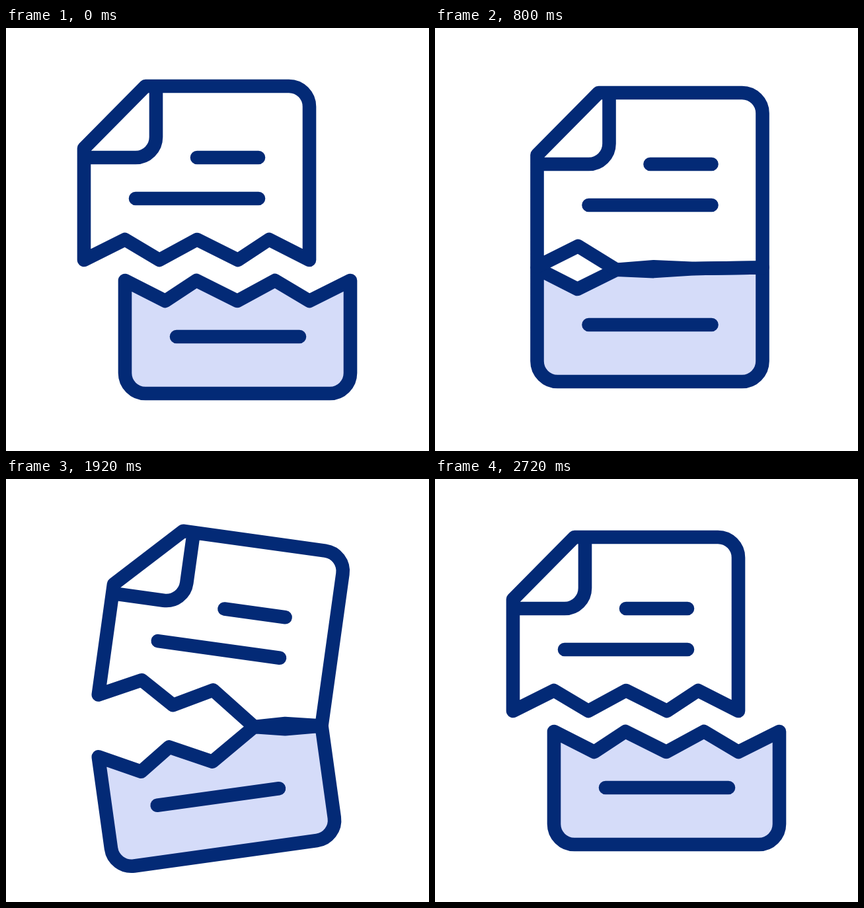
Write an HTML page with a canvas that moves like this. It is 640x640 px and loops after 3000 ms.

```html
<!DOCTYPE html>
<html lang="en">
<head>
<meta charset="utf-8">
<title>Torn page</title>
<style>
  html, body { margin: 0; height: 100%; overflow: hidden; background: #fff; }
  canvas { display: block; }
</style>
</head>
<body>
<canvas id="stage" width="640" height="640"></canvas>
<script>
const ctx = document.getElementById('stage').getContext('2d');
const LOOP = 3000, STEP = 40;
const UPPER_CORNER = [459, 351], LOWER_CORNER = [521, 382];

// Torn edges from right to left; the lower one is the upper one turned by 180 degrees
const upperEdge = [UPPER_CORNER];
for (const width of [61, 47, 62, 57, 52, 62]) {
  const i = upperEdge.length;
  upperEdge.push([upperEdge[i - 1][0] - width, 351 - 31 * (i % 2)]);
}
const lowerEdge = upperEdge.map(([x, y]) => [639 - x, 733 - y]).reverse();

const mix = (a, b, u) => a + (b - a) * u;
function ease(t, from, to) {
  const u = Math.min(1, Math.max(0, (t - from) / (to - from)));
  return u * u * (3 - 2 * u);
}
const bump = (t, from, peak, to) => ease(t, from, peak) * (1 - ease(t, peak, to));

// Rotates about a pivot and brings that pivot to (x, y)
function placer([px, py], x, y, degrees) {
  const r = degrees * Math.PI / 180, c = Math.cos(r), s = Math.sin(r);
  return ([a, b]) => [
    x + c * (a - px) - s * (b - py),
    y + s * (a - px) + c * (b - py)
  ];
}

// Both pieces hang on their right corners, which meet while the page is whole
function poseAt(t) {
  const lift = bump(t, 1240, 1600, 1840), drop = ease(t, 1600, 1900);
  const part = ease(t, 1960, 2400), settle = ease(t, 2400, 2720);
  const rock = bump(t, 200, 400, 800), tear = 7.95 * bump(t, 1380, 1900, 2400);
  const apart = 1 - ease(t, 200, 440), flat = ease(t, 400, 800) * (1 - ease(t, 1240, 1600));

  const x = 459 + 36.5 * ease(t, 200, 520) + 15.5 * lift - 18 * drop - 18.5 * settle;
  const y = 351 + 10 * ease(t, 200, 400) - 16 * lift + 12.5 * drop
    - 20 * ease(t, 1900, 2400) - 2.5 * settle;
  const gapX = 62 * apart + 32 * part + 30 * settle;
  const gapY = 31 * apart + 29 * part + 2 * settle + 3 * flat;
  const upperTilt = 3.6 * rock + tear, lowerTilt = -6.5 * rock - tear;
  return {
    upper: placer(UPPER_CORNER, x, y, upperTilt),
    lower: placer(LOWER_CORNER, x + gapX, y + gapY, lowerTilt),
    hinge: [x + gapX / 2, y + gapY / 2],
    slope: 0.015 - Math.tan((upperTilt + lowerTilt) * Math.PI / 360)
  };
}

// Teeth zip up from right to left and tear back; valleys lead in and lag out
function joined(i, t) {
  const pair = Math.max(0, Math.ceil(i / 2) - 1), valley = i % 2 === 0;
  const close = 275 + 365 * pair - (valley ? 75 : 0);
  const open = 1880 - 320 * pair + (valley ? 50 : 0);
  return ease(t, close, close + 200) * (1 - ease(t, open, open + 200));
}

function joinEdge(points, { hinge, slope }, t) {
  const last = points.length - 1;
  return points.map(([x, y], i) => {
    if (i === last) return [x, y];
    const p = joined(i, t), d = i ? 453 - upperEdge[i][0] : 0;
    return [i ? mix(x, hinge[0] - d, p) : x, mix(y, hinge[1] + d * slope, p)];
  });
}

const move = p => ctx.moveTo(...p);
const line = p => ctx.lineTo(...p);
const round = (corner, next) => ctx.arcTo(...corner, ...next, 31);
function bar(place, x1, x2, y) {
  move(place([x1, y]));
  line(place([x2, y]));
}

function drawLower(place, edge) {
  ctx.beginPath();
  edge.forEach((p, i) => i ? line(p) : move(p));
  round(place([180, 553]), place([521, 553]));
  round(place([521, 553]), edge[0]);
  ctx.closePath();
  ctx.fill();
  bar(place, 258, 444, 467);
  ctx.stroke();
}

function drawUpper(place, edge) {
  ctx.beginPath();
  edge.forEach((p, i) => i ? line(p) : move(p));
  line(place([118, 182]));
  line(place([211, 88]));
  round(place([459, 88]), edge[0]);
  ctx.closePath();
  move(place([227, 88]));
  round(place([227, 196]), place([118, 196]));
  line(place([118, 196]));
  bar(place, 289, 382, 196);
  bar(place, 196, 382, 258);
  ctx.stroke();
}

function draw(t) {
  const pose = poseAt(t);
  ctx.clearRect(0, 0, 640, 640);
  ctx.lineWidth = 20.6;
  ctx.lineCap = ctx.lineJoin = 'round';
  ctx.strokeStyle = '#032a76';
  ctx.fillStyle = '#d5dcf9';
  drawLower(pose.lower, joinEdge(lowerEdge.map(pose.lower), pose, t));
  drawUpper(pose.upper, joinEdge(upperEdge.map(pose.upper), pose, t));
}

const start = performance.now();
function tick() {
  const t = (performance.now() - start) % LOOP;
  draw(Math.floor(t / STEP) * STEP);
  requestAnimationFrame(tick);
}
tick();
</script>
</body>
</html>
```
